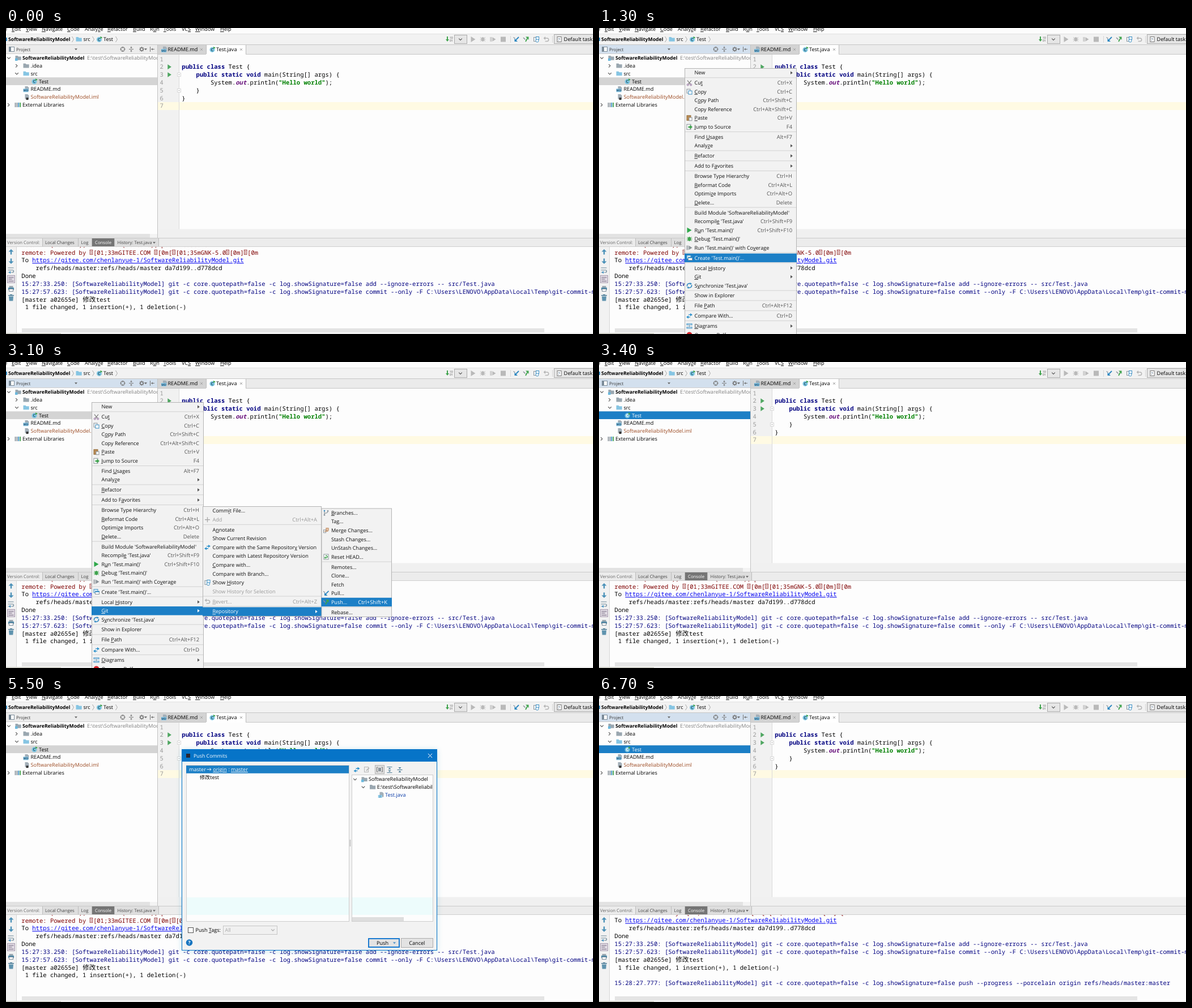
Animation of 1036x541 px, one loop 8000 ms. Source, as an HTML page:

```html
<!DOCTYPE html>
<html lang="en">
<head>
<meta charset="utf-8">
<title>Push from the IDE</title>
<style>
html,body{margin:0;width:100%;height:100%;overflow:hidden;background:#fdfdfd}
svg{display:block;width:1036px;height:541px;font:9.1px "Open Sans","Noto Sans","Noto Sans CJK SC",sans-serif;text-rendering:geometricPrecision}
text{white-space:pre}
.mono{font:500 10.55px "Noto Sans Mono","Noto Sans CJK SC",monospace}
.u{text-decoration:underline}
.lay{display:none}
.lay.on{display:inline}
.bar{fill:none}
.it.on .bar{fill:#1c7fc6}
.it.on text,.it.on .ar{fill:#fff}
#log .new{display:none}
#log.on{transform:translateY(-13.85px)}
#log.on .new{display:inline}
</style>
</head>
<body>
<svg id="stage" viewBox="0 0 1036 541"></svg>
<script>
const LOOP = 8000, BLUE = '#3a8fc4', GREEN = '#3fa34d', GRAY = '#8c959c', NAVY = '#000080';
const CW = 6.33, ROW = 13.85;

const R = (x, y, w, h, f, a = '') => `<rect x="${x}" y="${y}" width="${w}" height="${h}" fill="${f}" ${a}/>`;
const P = (d, s, w = 1, f = 'none') => `<path d="${d}" stroke="${s}" stroke-width="${w}" fill="${f}"/>`;
const F = (d, f, a = '') => `<path d="${d}" fill="${f}" ${a}/>`;
const C = (x, y, r, f, a = '') => `<circle cx="${x}" cy="${y}" r="${r}" fill="${f}" ${a}/>`;
const G = (a, ...kids) => `<g ${a}>${kids.join('')}</g>`;
// "_" marks the underlined mnemonic letter
const T = (x, y, s, a = '') => `<text x="${x}" y="${y}" ${a}>${s.replace(/_(.)/g, '<tspan class="u">$1</tspan>')}</text>`;
const bold = 'font-weight="700" font-size="8.7"';
const bar = (x, y, w, h) => `<rect class="bar" x="${x}" y="${y}" width="${w}" height="${h}"/>`;
const box = (x, y, w, h, f, s, a = '') => R(x + .5, y + .5, w - 1, h - 1, f, `stroke="${s}" ${a}`);
const down = (x, y, c = '#555') => P(`M${x - 2.8} ${y - 1.4}l2.8 2.8 2.8-2.8`, c, 1.1);
const right = (x, y, c = '#555') => P(`M${x - 1.4} ${y - 2.8}l2.8 2.8-2.8 2.8`, c, 1.1);
const cross = (x, y, r, c, w = 1) => P(`M${x - r} ${y - r}l${2 * r} ${2 * r}m0 ${-2 * r}l${-2 * r} ${2 * r}`, c, w);
const drop = (x, y, c = '#666') => F(`M${x - 2.5} ${y - 1.3}h5l-2.5 3z`, c);

const folder = c => F('M-5-4h4l1.3 1.5h4.9v6.2h-10.2z', c);
const page = F('M-2.5-5.2h4.5l2.5 2.3v6.4h-7z', '#a3afb8');
const swap = c => F('M1.5-4.7l4 2.6-4 2.6v-1.9h-3v-1.4h3z', c) + F('M-1.5-.5l-4 2.6 4 2.6v-1.9h3v-1.4h-3z', c);
const bug = c => `<ellipse rx="2.8" ry="3.8" fill="${c}"/>` + P('M-4.5-3.5l9 7m0-7l-9 7M-5 0h10', c, .9);
const shield = c => F('M-1-3.8l6 3.8-6 3.8z', c) + P('M-4.5-4v8M-2.6-4v8', c, 1.1);
const two = (a, b) => box(-5, -5, 7, 8, '#eef3f6', a) + box(-2, -2, 7, 7, '#fff', b);
const undo = c => P('M-3-2h4.5a2.6 2.6 0 0 1 0 5.4h-3.5', c, 1.5) + F('M-5-2l3.5-3v6z', c);
const I = {
  blueDir: folder('#86c5e3'), grayDir: folder('#9aa7b0'),
  module: folder('#9aa7b0') + R(-5.5, .5, 4.5, 4.5, '#6bb8dc'),
  cls: C(-.5, .4, 4.5, '#7cc4e0') + T(-3.1, 3, 'C', 'font-size="7.2" fill="#23566b" font-weight="700"') + F('M1.5-5.2l4 2.1-4 2.2z', GREEN),
  md: page + R(-5.5, -1, 9, 6, '#8cc8e6') + T(-5.2, 4, 'MD', 'font-size="5" font-weight="700" fill="#1d4f70"'),
  iml: page + R(-.5, 1, 4, 4, '#333'),
  java: page + R(-5.2, 0, 7, 5, '#8cc8e6') + T(-2.6, 4.2, 'J', 'font-size="5" fill="#1d4f70"'),
  lib: P('M-4.5-4v8M-1.5-4v8', GRAY, 1.8) + P('M1.3-4v8', BLUE, 1.8) + P('M4.2-4v8', GREEN, 1.8),
  cut: P('M-3.5-4.5l5.5 7M3.5-4.5l-5.5 7', '#777', 1.1) + C(-2.7, 3.3, 1.5, 'none', 'stroke="#8a6096"') + C(2.7, 3.3, 1.5, 'none', 'stroke="#8a6096"'),
  copy: two(GRAY, BLUE),
  paste: box(-5, -5, 8, 9.5, '#b98a55', '#96703f') + box(-1, -1.5, 6, 6.5, '#fff', GRAY),
  jump: box(-5, -5, 8, 10, '#fff', GRAY) + F('M-2-1h3v-2.5l4.5 3.8-4.5 3.8v-2.5h-3z', GREEN),
  run: F('M-4-4.7l8 4.7-8 4.7z', '#2fa84a'),
  bug: bug(GREEN), cov: shield('#8b9398'),
  win: box(-5, -5, 8, 7, '#dcebf4', BLUE) + box(-2.5, -1.5, 8, 6, '#fff', GRAY) + R(-2.5, -1.5, 8, 2, BLUE),
  sync: P('M-3.8 1.5a4 4 0 0 1 6-4.6M3.8-1.5a4 4 0 0 1-6 4.6', BLUE, 1.6) + F('M1-5.5l3.6 2-3.3 2zM-1 5.5l-3.6-2 3.3-2z', BLUE),
  cmp: swap('#2a90cc'),
  diag: box(-5, -4.5, 10, 3, '#fff', BLUE) + box(-5, 1.5, 10, 3, '#fff', BLUE) + P('M0-1.5v3', GRAY),
  dot: C(0, 0, 5, '#d3242b'),
  plus: P('M-4.5 0h9M0-4.5v9', '#aaa', 1.4),
  hist: box(-5, -4, 7, 8, '#eef3f6', GRAY) + box(-1, -5, 6, 6, '#fff', BLUE) + C(1.5, 2.5, 2.5, '#fff', `stroke="${BLUE}"`),
  undo: undo('#b5b5b5'),
  branch: P('M-3-3v6.5M3-2.5c0 4-6 2-6 4', GRAY, 1.2) + C(-3, -3.6, 1.4, BLUE) + C(-3, 3.8, 1.4, GRAY) + C(3, -3.3, 1.4, GRAY),
  merge: box(-5, -1.5, 5, 6, '#fff', GRAY) + box(-.5, -4.5, 5, 5, '#f1d2b8', '#b57a4a') + P('M-3.5 1.5h7', '#b57a4a'),
  reset: box(-4.5, -5, 9, 10, '#fff', GRAY) + P('M-2 1.5h3a1.8 1.8 0 0 0 0-3.4h-2', GREEN, 1.4) + F('M-3.5 1.5l2.5-2v4z', GREEN),
  pull: P('M4.5-4l-5 5', '#2a86c0', 1.8) + F('M-3 4v-5.5l5.5 5.5z', '#2a86c0') + P('M-5-3.5l3 2', GRAY, 1.4),
  push: P('M-1 4l3-5.5', GREEN, 1.8) + F('M4.5-4.5v5.5l-5.5-5.5z', GREEN) + P('M-5-3l3.5 3.5', GRAY, 1.6),
  page: box(-4, -5, 8, 10, '#fff', '#777') + T(-2, 3, '?', 'font-size="7" fill="#246"')
};
const ico = (n, x, y) => G(`transform="translate(${x} ${y})"`, I[n]);

// items: label|shortcut, leading "!" disabled, trailing ">" submenu, "-" separator
function menu(id, pre, x, y, w, h, icons, list) {
  let c = y + 8.2, n = 0, out = box(x, y, w, h, '#f2f2f2', '#b4b4b4');
  for (const raw of list.split('\n')) {
    if (raw === '-') {
      out += R(x + 1, (c - 7.4).toFixed(1), w - 2, 1, '#d2d2d2');
      c += 2.32;
      continue;
    }
    const [label, key] = raw.replace(/[!>]/g, '').split('|');
    const off = raw[0] === '!';
    const kids = [bar(x, c - 7.75, w, 15.5), T(x + 17.4, c + 3.2, label, `fill="${off ? '#999' : '#111'}"`)];
    if (icons[n]) kids.push(ico(icons[n], x + 8.5, c));
    if (key) kids.push(T(x + w - 8, c + 3.2, key, `text-anchor="end" font-size="9.4" fill="${off ? '#999' : '#555'}"`));
    if (raw.endsWith('>')) kids.push(F(`M${x + w - 11} ${c - 2.8}l3.8 2.8-3.8 2.8z`, '#555', 'class="ar"'));
    out += G(`class="it" id="${pre}${n++}"`, ...kids);
    c += 15.55;
  }
  return G(`class="lay" id="${id}"`, out);
}

function topBars() {
  let s = R(0, 0, 1036, 10, '#fcfcfc') + R(0, 10, 1036, 20, '#f2f2f2') + R(0, 10, 1036, 1, '#e2e2e2') + R(0, 29, 1036, 1, '#c6c6c6');
  const names = '_Edit _View _Navigate _Code Analy_ze _Refactor _Build R_un _Tools VC_S _Window _Help'.split(' ');
  [10, 35, 63, 108, 139, 179, 224, 254, 278, 310, 334, 378].forEach((x, i) => s += T(x, 5.2, names[i]));
  s += T(-3, 5.2, 'e') + R(0, 17, 2, 6, BLUE) + T(4, 23.2, 'SoftwareReliabilityModel', bold);
  s += ico('blueDir', 128.5, 20) + T(136.5, 23.2, 'src') + ico('cls', 165, 20) + T(172, 23.2, 'Test');
  for (const x of [118, 154, 195]) s += P(`M${x - 1.5} 15l3 5-3 5`, '#aaa');
  s += F('M778 15h2v5h2l-3 4-3-4h2z', GREEN) + T(783, 19, '10', 'font-size="5" fill="#444"') + T(783, 24, '01', 'font-size="5" fill="#444"');
  s += box(791, 12, 23, 16, '#e6e6e6', '#ababab') + down(802, 20);
  s += F('M820.5 15l8 5-8 5z', '#b9b9b9');
  s += G('transform="translate(841.5 20)"', bug('#b9b9b9')) + G('transform="translate(859.5 20)"', shield('#b9b9b9')) + R(873, 15.5, 9, 9, '#b9b9b9');
  s += R(890, 14, 1, 12, '#d5d5d5') + ico('pull', 900.5, 20) + ico('push', 918, 20) + ico('hist', 936, 20) + ico('undo', 953.5, 20) + R(964, 14, 1, 12, '#d5d5d5');
  return s + box(967, 11, 80, 17, '#e6e6e6', '#ababab') + ico('page', 976.5, 20) + T(984.5, 23.2, 'Default task');
}

function tree() {
  const y = i => 53 + i * 13.82;
  let s = R(0, 30, 267, 16, '#ececec') + G('class="lay" id="focus"', R(0, 30, 267, 16, '#d3e0ee')) + R(0, 45, 267, 1, '#cfcfcf');
  s += box(5, 33, 10, 9, '#fff', '#7b8b98') + R(5, 33, 4, 9, '#7b8b98') + T(18, 40.7, 'Project', 'font-size="7.8" fill="#333"') + drop(123.5, 37.5);
  s += C(206, 37.5, 3.6, 'none', 'stroke="#777" stroke-width="1.1"') + P('M206 33v3m0 3v3m-4.5-4.5h3m3 0h3', '#777');
  s += P('M217 37.5h8M221 32.5v3m0 4v3', '#777') + F('M219 34h4l-2 2zM219 41h4l-2-2z', '#777');
  s += C(239.5, 37.5, 2.5, 'none', 'stroke="#777" stroke-width="1.5"');
  s += P('M239.5 33v2m0 5v2m-4.5-4.5h2m5 0h2m-7.6-3.1l1.3 1.3m3.6 3.6l1.3 1.3m0-6.2l-1.3 1.3m-3.6 3.6l-1.3 1.3', '#777', 1.2) + drop(246.5, 37.5);
  s += P('M254.5 33v9M256 37.5h6', '#777') + F('M256 37.5l3-2v4z', '#777');
  s += R(0, 46, 267, 318, '#fdfdfd') + R(0, 87.3, 267, 13.7, '#d4d4d4');
  s += down(5, y(0)) + ico('module', 21.5, y(0)) + T(29, y(0) + 3.2, 'SoftwareReliabilityModel', bold);
  s += T(143, y(0) + 3.2, 'E:\\test\\SoftwareReliabilityModel', 'fill="#808080"');
  s += right(18.5, y(1)) + ico('grayDir', 35.5, y(1)) + T(43.5, y(1) + 3.2, '.idea');
  s += down(19, y(2)) + ico('blueDir', 35.5, y(2)) + T(43.5, y(2) + 3.2, 'src');
  s += G('class="it" id="row"', bar(0, 87.3, 267, 13.7), ico('cls', 50.5, y(3)), T(58, y(3) + 3.2, 'Test'));
  s += ico('md', 36, y(4)) + T(43.5, y(4) + 3.2, 'README.md');
  s += ico('iml', 36, y(5)) + T(43.5, y(5) + 3.2, 'SoftwareReliabilityModel.iml', 'fill="#9c4a22"');
  s += right(4.5, y(6)) + ico('lib', 21, y(6)) + T(29, y(6) + 3.2, 'External Libraries');
  return G('clip-path="url(#left)"', s + R(0, 364, 267, 7, '#f3f3f3') + R(0, 364, 254, 7, '#e2e2e2')) + R(267, 30, 1, 341, '#c3c3c3');
}

function editor() {
  const y = n => 55 + (n - 1) * 13.83 + 3.5, x = c => 310.3 + c * CW;
  const kw = s => `<tspan fill="${NAVY}" font-weight="700">${s}</tspan>`;
  let s = R(268, 30, 768, 16, '#ebebeb') + R(268, 30, 85, 16, '#d3d3d3') + R(353, 30, 70, 17, '#fff') + R(268, 46, 85, 1, '#c6c6c6') + R(423, 46, 613, 1, '#c6c6c6');
  s += R(353, 30, 1, 16, '#bbb') + R(423, 30, 1, 16, '#bbb');
  s += ico('md', 279.5, 38) + T(285.5, 41, 'README.md') + cross(345, 38, 2, '#a5a5a5') + ico('cls', 364.5, 38) + T(371, 41, 'Test.java') + cross(415, 38, 2, '#a5a5a5');
  s += R(268, 47, 768, 309, '#fdfdfd') + R(268, 47, 37, 309, '#f1f1f1') + R(268, 131, 768, 14, '#fffae3') + R(305, 47, 1, 309, '#dadada');
  s += R(268, 355.5, 768, 16, '#f0f0f0');
  for (let n = 1; n < 8; n++) s += T(271.5, y(n), '' + n, 'class="mono" fill="#999"');
  for (const n of [2, 3]) s += F(`M285.3 ${y(n) - 8}l6.6 4.4-6.6 4.4z`, '#4fa661');
  for (const n of [3, 5]) s += box(302, Math.round(y(n) - 7), 7, 7, '#fff', '#d8d8d8') + P(`M304 ${Math.round(y(n)) - 3.5}h3`, '#bbb');
  const line = (n, c, t) => T(x(c), y(n), t, 'class="mono"');
  s += line(2, 0, kw('public class') + ' Test {') + line(3, 4, kw('public static void') + ' main(String[] args) {');
  s += line(4, 8, 'System.<tspan fill="#660e7a" font-weight="700" font-style="italic">out</tspan>.println(<tspan fill="#008000" font-weight="700">"Hello world"</tspan>);');
  return s + line(5, 4, '}') + line(6, 0, '}');
}

function consolePane() {
  const tab = (x, s, a = 'fill="#444"') => T(x, 382, s, `font-size="7.75" ${a}`);
  let s = R(0, 371, 1036, 16, '#ececec') + R(0, 371, 1036, 1, '#c9c9c9') + R(0, 386, 1036, 1, '#cfcfcf');
  s += R(64, 372, 205, 14, '#dedede') + R(151, 372, 40, 14, '#757575');
  for (const x of [64, 127, 151, 191, 269]) s += R(x, 372, 1, 14, '#bdbdbd');
  s += tab(2, 'Version Control:', 'fill="#666"') + tab(69, 'Local Changes') + tab(132.5, 'Log') + tab(157, 'Console', 'fill="#fff"') + tab(196.5, 'History: Test.java') + drop(261.5, 379.5);
  s += R(0, 387, 1036, 154, '#fdfdfd') + R(0, 387, 18, 154, '#f2f2f2') + R(18, 387, 1, 154, '#d6d6d6');
  s += F('M9 391l4.5 4.5h-3.3v5h-2.4v-5h-3.3z', '#4b91b8') + F('M9 417l4.5-4.5h-3.3v-5h-2.4v5h-3.3z', '#4b91b8');
  s += P('M3.5 424h10M3.5 428h8a2 2 0 0 1 0 4h-3M3.5 432h3', '#6d8797', 1.2) + F('M8 429.5v5l-3-2.5z', BLUE);
  s += box(2, 437, 14, 14, '#dfd9e2', '#a99db0') + P('M4.5 441h9M4.5 444h6M4.5 447.5h9', '#756b80', 1.1);
  s += R(5.5, 456, 7, 3, '#9aa7b0') + R(4, 459, 10, 4, '#4d89a8') + box(5, 461, 8, 5, '#fff', '#7b8b98');
  s += R(4, 472, 10, 1.5, '#4d7d98') + R(7, 471, 4, 1, '#4d7d98') + F('M5 474.5h8l-.7 8h-6.6z', '#5f93ae');
  const line = (n, c, t, f = '#000', a = '') => T(27.3 + c * CW, +(400.5 + n * ROW).toFixed(2), t, `class="mono ${a}" fill="${f}"`);
  const git = ' [SoftwareReliabilityModel] git -c core.quotepath=false -c log.showSignature=false ';
  const red = '#7f0000';
  let log = line(-1, 0, 'Total 4 (delta 1), reused 0 (delta 0), pack-reused 0', red);
  log += line(0, 0, 'remote: Powered by', red) + line(0, 20, '[01;33mGITEE.COM', red) + line(0, 38, '[0m[', red) + line(0, 43, '[01;35mGNK-5.0', red) + line(0, 58, '[0m]', red) + line(0, 63, '[0m', red);
  for (const c of [19, 37, 42, 57, 62]) {
    const bx = 27.8 + c * CW;
    log += R(bx, 392.5, 4.8, 8, 'none', `stroke="${red}" stroke-width=".7"`) + P(`M${bx + 1.2} 395h2.4m-2.4 3h2.4`, red, .9);
  }
  log += line(1, 0, 'To') + line(1, 3, 'https://gitee.com/chenlanyue-1/SoftwareReliabilityModel.git', '#0000f0', 'u');
  log += line(2, 4, 'refs/heads/master:refs/heads/master da7d199..d778dcd') + line(3, 0, 'Done');
  log += line(4, 0, '15:27:33.250:' + git + 'add --ignore-errors -- src/Test.java', NAVY);
  log += line(5, 0, '15:27:57.623:' + git + 'commit --only -F C:\\Users\\LENOVO\\AppData\\Local\\Temp\\git-commit-msg-.txt', NAVY);
  log += line(6, 0, '[master a02655e]') + T(135.2, 400.5 + 6 * ROW, '修改', 'font-size="11.6"') + line(6, 20.8, 'test');
  log += line(7, 1, '1 file changed, 1 insertion(+), 1 deletion(-)');
  log += line(9, 0, '15:28:27.777:' + git + 'push --progress --porcelain origin refs/heads/master:master', NAVY, 'new');
  s += G('clip-path="url(#term)"', G('id="log"', log));
  return s + R(28, 531, 922, 7, '#e4e4e4') + R(0, 539, 1036, 2, '#ededed') + R(0, 539.5, 97, 1.5, '#c9c9c0');
}

function menus() {
  const a = { 1: 'cut', 2: 'copy', 5: 'paste', 6: 'jump', 17: 'run', 18: 'bug', 19: 'cov', 20: 'win', 23: 'sync', 26: 'cmp', 27: 'diag', 28: 'dot' };
  const b = { 1: 'plus', 4: 'cmp', 8: 'hist', 10: 'undo' };
  const c = { 0: 'branch', 2: 'merge', 5: 'reset', 9: 'pull', 10: 'push' };
  return menu('menu', 'm', 151, 71, 198, 490, a, `New>
-
Cu_t|Ctrl+X
_Copy|Ctrl+C
C_opy Path|Ctrl+Shift+C
Copy Reference|Ctrl+Alt+Shift+C
_Paste|Ctrl+V
_Jump to Source|F4
-
Find _Usages|Alt+F7
Analy_ze>
-
_Refactor>
-
Add to F_avorites>
-
Browse Type Hierarchy|Ctrl+H
_Reformat Code|Ctrl+Alt+L
Optimi_ze Imports|Ctrl+Alt+O
_Delete...|Delete
-
Build Module 'SoftwareReliabilityModel'
Recompil_e 'Test.java'|Ctrl+Shift+F9
R_un 'Test.main()'|Ctrl+Shift+F10
_Debug 'Test.main()'
Run 'Test.main()' with Co_verage
-
Create 'Test.main()'...
-
Local _History>
_Git>
S_ynchronize 'Test.java'
-
Show in Explorer
-
File _Path|Ctrl+Alt+F12
-
Compare With...|Ctrl+D
-
_Diagrams>
Open on Belfo`) + menu('sub', 's', 347, 255, 210, 195, b, `Comm_it File...
!Add|Ctrl+Alt+A
-
A_nnotate
Show Current Revision
Compare with the Same Repositor_y Version
Compare with Latest Repository Version
_Compare with...
Compare with Branch...
Show _History
!Show History for Selection
-
!_Revert...|Ctrl+Alt+Z
-
_Repository>`) + menu('sub2', 'r', 556.5, 258.5, 124.5, 192.5, c, `_Branches...
Tag...
Merge Changes...
Stash Changes...
UnStash Changes...
Reset HEAD...
-
Remotes...
Clone...
Fetch
Pull...
Push...|Ctrl+Shift+K
-
Rebase...`);
}

function dialog() {
  const frame = R(310, 94, 451, 356, '#0674c8', 'style="filter:drop-shadow(0 1px 5px #0a93b83a)"') + R(311, 116, 449, 333, '#f2f2f2') +
    R(318, 102, 7, 7, '#2a2530') + T(331, 108.8, 'Push Commits', 'fill="#fff" font-size="8.8"') + cross(748.5, 105.5, 3.6, '#fff');
  let s = box(318, 122, 288, 277, '#fdfdfd', '#cdcdcd') + box(610, 139, 144, 260, '#fdfdfd', '#cdcdcd');
  s += R(319, 356, 286, 31, '#edfcfc') + R(611, 356, 142, 31, '#edfcfc');
  s += G('class="lay" id="dim"', R(319, 123, 286, 13.7, '#d4d4d4'));
  s += G('class="it" id="c0"', bar(318, 123, 287, 13.7),
    T(323, 133, 'master'), P('M354.5 129.8h7.5m-2.5-2.3l2.5 2.3-2.5 2.3', '#fff', .9),
    T(365.3, 133, 'origin', 'class="u"'), T(392.5, 133, ':'), T(397, 133, 'master', 'class="u"'));
  s += G('class="it" id="c1"', bar(318, 137, 287, 13.7), T(342, 147, '修改test'));
  s += G('transform="translate(619 130.3)"', swap('#b5b5b5')) + G('class="lay" id="ready"', R(613, 125, 12, 11, '#f2f2f2'), ico('cmp', 619, 130.3));
  s += box(632, 125, 8, 10, '#eee', '#b9b9b9') + P('M636 132l5-5', '#b0b0b0', 1.6);
  s += box(651, 122, 17, 16, '#dedede', '#b5b5b5') + P('M656.5 126h-2v8h2M662.5 126h2v8h-2', '#777') + R(657, 127, 5, 6, GRAY);
  s += P('M672.5 125.5h9m-9 10h9', '#4d7d98', 1.2) + F('M677 126.8l2.5 2.7h-5zM677 134.2l2.5-2.7h-5z', '#4d7d98');
  s += P('M690.5 130.5h9', '#4d7d98', 1.2) + F('M695 129l2.5-3h-5zM695 132l2.5 3h-5z', '#4d7d98');
  s += G('clip-path="url(#files)"', down(616, 147.3), ico('module', 632.5, 147.3), T(640, 150.4, 'SoftwareReliabilityModel'),
    down(630.5, 161), ico('grayDir', 647, 161), T(654.8, 164.2, 'E:\\test\\SoftwareReliabilityModel'),
    ico('java', 662, 175), T(669, 178, 'Test.java', 'fill="#0a3ca8"'), R(611, 391, 91, 7, '#dedede'));
  s += P('M607.5 254v12', '#bbb', 1.5);
  s += box(321, 409, 10, 10, '#fff', '#555') + T(334.5, 417, 'Push _Tags:') + box(383, 406, 96, 16, '#f0f0f0', '#c6c6c6') + T(386.5, 417, 'All', 'fill="#aaa"') + down(471, 413.7, '#aaa');
  s += C(323.5, 436, 5.8, '#1875c0') + T(321.4, 439.2, '?', 'fill="#fff" font-weight="700" font-size="8.5"');
  s += R(640, 429, 54, 15, '#e3e3e3', 'stroke="#1a7ad0" stroke-width="2"') + T(654, 439.7, 'Push') + drop(685.5, 436.5, '#4b91c8');
  s += box(697, 428, 57, 17, '#e3e3e3', '#adadad') + T(711.3, 439.7, 'Cancel');
  return G('class="lay" id="dlg"', frame, G('class="lay" id="body"', s)) + G('class="lay" id="tip"', R(639, 460, 59, 19, '#f5f5f5'));
}

const clip = (id, x, y, w, h) => `<clipPath id="${id}">${R(x, y, w, h, '#000')}</clipPath>`;
const stage = document.getElementById('stage');
stage.innerHTML = clip('left', 0, 30, 267, 341) + clip('term', 19, 387, 1017, 144) + clip('files', 611, 140, 142, 258) +
  topBars() + tree() + editor() + consolePane() + menus() + dialog();

const open = 'focus menu', git = open + ' m22', sub = git + ' sub', push = 'dlg body', ready = push + ' ready';
const steps = [
  [0, ''], [800, 'focus row'], [1000, open], [1100, open + ' m12'], [1200, open + ' m17'], [1300, open + ' m20'],
  [1400, git], [1600, sub], [1900, open + ' m23'], [2100, git], [2300, sub], [2500, sub + ' s11'],
  [2700, sub + ' s11 sub2'], [3100, sub + ' s11 sub2 r10'], [3400, 'focus row'], [3500, 'dlg'],
  [3600, push + ' c0'], [4000, ready + ' c0'], [4500, ready + ' c1'], [5500, ready + ' c0'],
  [6100, ready + ' dim tip'], [6300, ''], [6400, 'focus row'], [6700, 'focus row log']
];
const parts = [...stage.querySelectorAll('.lay,.it,#log')];
const start = performance.now();
let shown = null;
function tick() {
  const t = (performance.now() - start) % LOOP;
  const state = steps.findLast(s => s[0] <= t)[1];
  if (state !== shown) {
    const on = state.split(' ');
    for (const p of parts) p.classList.toggle('on', on.includes(p.id));
    shown = state;
  }
  requestAnimationFrame(tick);
}
tick();
</script>
</body>
</html>
```
